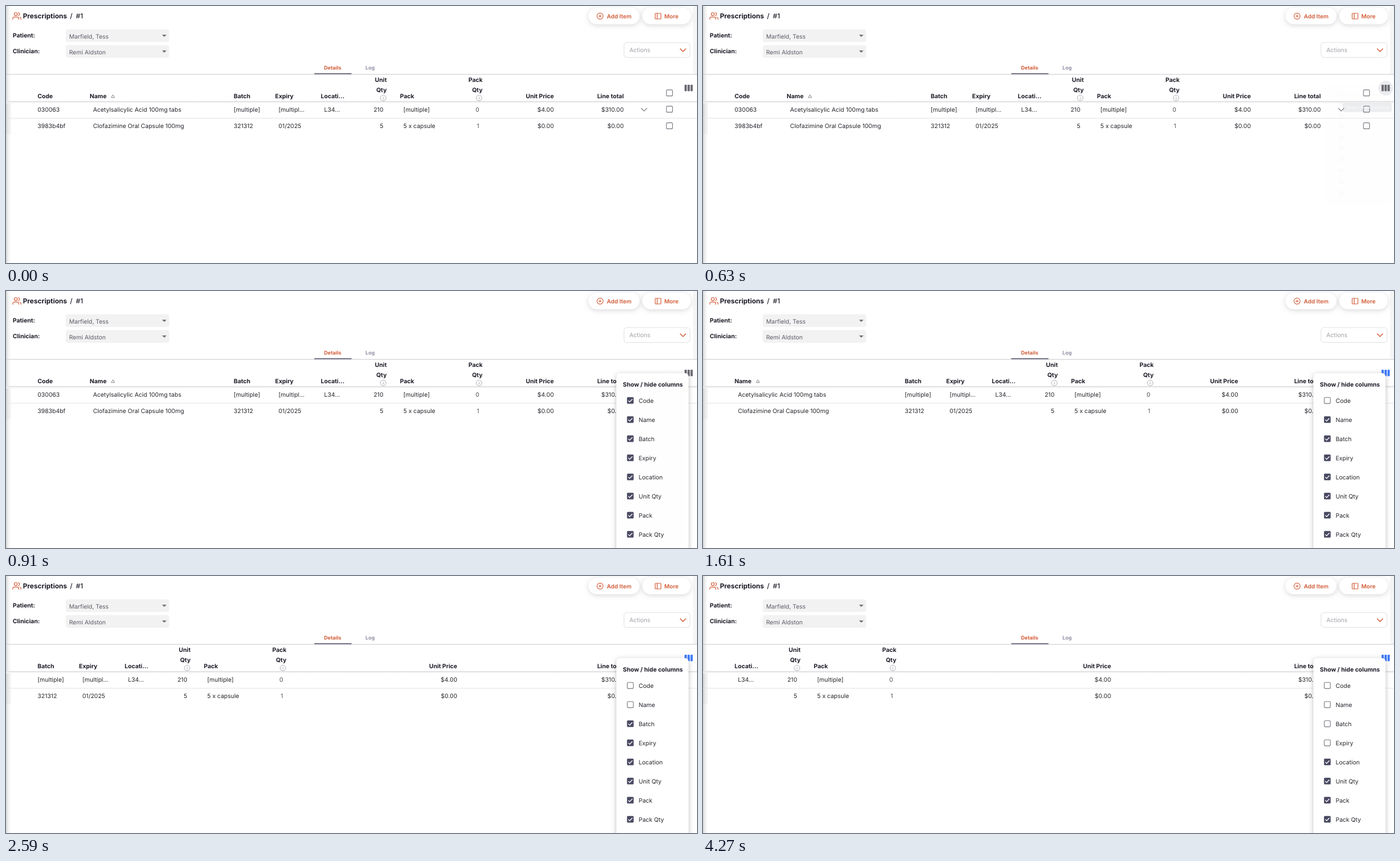
An HTML page with a canvas for the animation above (5250 ms loop, 1226 by 457 pixels).

```html
<!DOCTYPE html>
<html lang="en">
<head>
<meta charset="utf-8">
<title>Column visibility</title>
<style>
  html, body { margin: 0; width: 100%; height: 100%; overflow: hidden; background: #fff; }
  canvas { display: block; width: 1226px; height: 457px; }
</style>
</head>
<body>
<canvas id="stage"></canvas>
<script>
const W = 1226, H = 457, LOOP = 5250, TICK = 70;
const canvas = document.getElementById('stage');
const ctx = canvas.getContext('2d');
const dpr = window.devicePixelRatio || 1;
canvas.width = W * dpr;
canvas.height = H * dpr;
// Keep fractional glyph advances so small text is not snapped to whole pixels
ctx.textRendering = 'geometricPrecision';

const INK = '#1c1c28', BODY = '#25252c', GREY = '#5c5c66';
const ORANGE = '#d15a35', BLUE = '#3e7bfa', SLATE = '#4a4a63';

// Times at which Code, Name, Batch and Expiry are switched off
const HIDE_TIMES = [1610, 2520, 3430, 4270];
// Horizontal shift of the left columns and right edge of Unit Price, by hidden count
const SHIFT = [0, -46, -348, -421.5, -502.5];
const PRICE_RIGHT = [972, 949.5, 800.5, 764, 724];

const LEFT_COLUMNS = [
  { title: 'Batch', x: 404, inset: 0, cells: ['[multiple]', '321312'], until: 3 },
  { title: 'Expiry', x: 477.5, inset: 6, cells: ['[multipl...', '01/2025'], until: 4 },
  { title: 'Locati...', x: 558.5, inset: 6, cells: ['L34...', ''], until: 5 },
  { title: 'Pack', x: 699, inset: 6, cells: ['[multiple]', '5 x capsule'], until: 5 }
];
const QTY_COLUMNS = [
  { title: 'Unit', right: 675.5, cells: ['210', '5'], color: BODY },
  { title: 'Pack', right: 845.5, cells: ['0', '1'], color: '#4c4c55' }
];
const MENU = ['Code', 'Name', 'Batch', 'Expiry', 'Location', 'Unit Qty', 'Pack', 'Pack Qty', 'Unit Price'];
const ROW_Y = [184, 213.5];
const HEAD_Y = 160.5;

const users = new Path2D('M17 21v-2a4 4 0 0 0-4-4H5a4 4 0 0 0-4 4v2 M13 7a4 4 0 1 1-8 0a4 4 0 1 1 8 0 ' +
  'M23 21v-2a4 4 0 0 0-3-3.87 M16 3.13a4 4 0 0 1 0 7.75');

const clamp = v => Math.min(1, Math.max(0, v));

// Standard material easing, cubic-bezier(0.4, 0, 0.2, 1)
function ease(x) {
  x = clamp(x);
  let lo = 0, hi = 1;
  for (let i = 0; i < 24; i++) {
    const m = (lo + hi) / 2, n = 1 - m;
    if (1.2 * n * n * m + 0.6 * n * m * m + m * m * m < x) lo = m; else hi = m;
  }
  return lo * lo * (3 - 2 * lo);
}

// y is the middle of the capitals
function text(s, x, y, { size = 10.5, weight = 400, color = BODY, align = 'left' } = {}) {
  ctx.font = `${weight} ${size}px Inter, sans-serif`;
  ctx.textAlign = align;
  ctx.fillStyle = color;
  ctx.fillText(s, x, y + size * 0.364);
}

const heading = (s, x, y = HEAD_Y, align = 'left') => text(s, x, y, { weight: 700, color: INK, align });

function box(x, y, w, h, r, fill) {
  ctx.beginPath();
  ctx.roundRect(x, y, w, h, r);
  if (fill) {
    ctx.fillStyle = fill;
    ctx.fill();
  }
}

function stroke(color, width = 1, path) {
  ctx.strokeStyle = color;
  ctx.lineWidth = width;
  path ? ctx.stroke(path) : ctx.stroke();
}

function poly(points, color, width, close) {
  ctx.beginPath();
  points.forEach(([x, y]) => ctx.lineTo(x, y));
  if (close) ctx.closePath();
  stroke(color, width);
}

function circle(x, y, r) {
  ctx.beginPath();
  ctx.arc(x, y, r, 0, Math.PI * 2);
}

function shadowed(blur, dy, alpha, draw) {
  ctx.save();
  ctx.shadowColor = `rgba(0,0,0,${alpha})`;
  ctx.shadowBlur = blur * dpr;
  ctx.shadowOffsetY = dy * dpr;
  draw();
  ctx.restore();
}

function checkbox(x, y, checked) {
  if (!checked) {
    box(x - 5.4, y - 5.4, 10.8, 10.8, 2);
    stroke('#74747e', 1.1);
    return;
  }
  box(x - 5.9, y - 5.9, 11.8, 11.8, 1.6, SLATE);
  poly([[x - 3.6, y + 0.2], [x - 1.2, y + 2.6], [x + 3.7, y - 2.5]], '#fff', 1.3);
}

function select(y, value) {
  box(106, y - 11.5, 183.5, 22.5, 4, '#f2f2f3');
  text(value, 112, y + 1, { color: GREY });
  ctx.beginPath();
  [[276.8, y - 2], [284.8, y - 2], [280.8, y + 2.1]].forEach(p => ctx.lineTo(...p));
  ctx.fillStyle = '#707078';
  ctx.fill();
}

function pill(x, w, label, labelX) {
  shadowed(8, 2, 0.15, () => box(x, 3, w, 29.5, 15, '#fff'));
  text(label, labelX, 18, { size: 10.1, weight: 600, color: ORANGE });
}

function drawEdges() {
  const g = ctx.createLinearGradient(0, 0, 9, 0);
  g.addColorStop(0, 'rgba(0,0,0,.17)');
  g.addColorStop(0.4, 'rgba(0,0,0,.06)');
  g.addColorStop(1, 'rgba(0,0,0,0)');
  ctx.fillStyle = g;
  ctx.fillRect(0, 0, 9, H);
  ctx.fillStyle = 'rgba(0,0,0,.03)';
  ctx.fillRect(0, 171, 9, 57);
  ctx.fillStyle = '#f5f5f6';
  ctx.fillRect(1219, 0, 7, 121);
}

function drawHeader() {
  ctx.save();
  ctx.translate(11.4, 9.8);
  ctx.scale(0.66, 0.66);
  ctx.lineCap = ctx.lineJoin = 'round';
  stroke(ORANGE, 1.8, users);
  ctx.restore();
  text('Prescriptions', 30, 17.3, { size: 12, weight: 700, color: INK });
  text('/', 113.5, 17.3, { size: 12, weight: 500, color: INK });
  text('#1', 124, 17.3, { size: 12, weight: 500, color: INK });

  heading('Patient:', 12, 52.5);
  heading('Clinician:', 12, 80.5);
  select(53, 'Marfield, Tess');
  select(81, 'Remi Aldston');

  pill(1033.5, 90.5, 'Add Item', 1066);
  circle(1054, 18, 5.4);
  stroke(ORANGE, 1.1);
  poly([[1051.4, 18], [1056.6, 18]], ORANGE, 1.1);
  poly([[1054, 15.4], [1054, 20.6]], ORANGE, 1.1);
  pill(1129, 86, 'More', 1168);
  box(1151.8, 13, 10.2, 10, 1);
  stroke(ORANGE, 1.2);
  poly([[1155.4, 13], [1155.4, 23]], ORANGE, 1.2);

  box(1096.5, 65, 117, 26.5, 5);
  stroke('#dfdfe4');
  text('Actions', 1106, 78.5, { color: '#a0a0a8' });
  poly([[1196, 75.8], [1201.2, 81], [1206.4, 75.8]], ORANGE, 1.5);

  text('Details', 579.5, 110, { size: 9, weight: 700, color: ORANGE, align: 'center' });
  text('Log', 646, 110, { size: 9, weight: 700, color: '#8f90a6', align: 'center' });
  ctx.fillStyle = '#cbcbd0';
  ctx.fillRect(0, 121, W, 1);
  ctx.fillStyle = '#555770';
  ctx.fillRect(547, 119.6, 66, 1.6);
}

function drawNameColumn(x) {
  heading('Name', x);
  const c = x + 41.3;
  poly([[c, 157.8], [c + 3, 162.8], [c - 3, 162.8]], '#74747d', 0.9, true);
  text('Acetylsalicylic Acid 100mg tabs', x + 6, ROW_Y[0]);
  text('Clofazimine Oral Capsule 100mg', x + 6, ROW_Y[1]);
}

function infoIcon(x, y) {
  circle(x, y, 5);
  stroke('#9a9aa2', 0.8);
  ctx.fillStyle = '#9a9aa2';
  ctx.fillRect(x - 0.4, y - 0.7, 0.9, 3.2);
  ctx.fillRect(x - 0.4, y - 2.6, 0.9, 1);
}

function drawTable(hidden) {
  const g = ctx.createLinearGradient(0, 169, 0, 174);
  g.addColorStop(0, '#d9d9dc');
  g.addColorStop(0.4, '#eeeeef');
  g.addColorStop(1, 'rgba(255,255,255,0)');
  ctx.fillStyle = g;
  ctx.fillRect(0, 169, W, 5);
  ctx.fillStyle = '#e4e4e7';
  ctx.fillRect(0, 199, W, 1);

  const shift = SHIFT[hidden];
  if (hidden === 0) {
    heading('Code', 56);
    ['030063', '3983b4bf'].forEach((s, i) => text(s, 56, ROW_Y[i]));
  }
  if (hidden < 2) drawNameColumn(hidden ? 56 : 148.5);

  for (const { title, x, inset, cells, until } of LEFT_COLUMNS) {
    if (hidden >= until) continue;
    heading(title, x + shift);
    cells.forEach((s, i) => text(s, x + shift + inset, ROW_Y[i]));
  }
  for (const { title, right, cells, color } of QTY_COLUMNS) {
    const r = right + shift;
    heading(title, r, 131, 'right');
    heading('Qty', r, 149, 'right');
    infoIcon(r - 6.2, 163.5);
    cells.forEach((s, i) => text(s, r - 6, ROW_Y[i], { align: 'right', color }));
  }
  const money = (title, right, cells) => {
    heading(title, right, HEAD_Y, 'right');
    cells.forEach((s, i) => text(s, right, ROW_Y[i], { align: 'right' }));
  };
  money('Unit Price', PRICE_RIGHT[hidden], ['$4.00', '$0.00']);
  money('Line total', 1096, ['$310.00', '$0.00']);

  poly([[1127, 181.6], [1132.2, 186.8], [1137.4, 181.6]], '#66666f', 1.1);
  [154.5, 183.5, 213].forEach(y => checkbox(1177.2, y, false));
}

function drawColumnsIcon(t, hidden) {
  const hover = clamp((t - 520) / 130) * clamp((840 - t) / 140);
  if (hover > 0) {
    circle(1211.3, 146, 13);
    ctx.fillStyle = `rgba(40,41,61,${0.1 * hover})`;
    ctx.fill();
  }
  for (let i = 0; i < 3; i++) {
    box(1203.9 + i * 5.3, 140, 4, 11.5, 0.8, hidden ? BLUE : '#6b6b73');
  }
}

function drawMenu(t, hidden) {
  const age = t - 602;
  if (age <= 0) return;
  const grow = ease(age / 231);
  const scale = 0.75 + 0.25 * grow;
  ctx.save();
  ctx.globalAlpha = ease(age / 347);
  ctx.translate(1211, 146);
  ctx.scale(scale, 0.5625 + 0.4375 * grow);
  ctx.translate(-1211, -146);
  shadowed(9, 2, 0.26, () => box(1083, 146, 128, 340, 6, '#fff'));
  heading('Show / hide columns', 1094.5, 166.5);
  MENU.forEach((label, i) => {
    const y = 195 + 34 * i;
    checkbox(1107.7, y - 0.3, i >= hidden);
    text(label, 1122.5, y + 0.3);
  });
  ctx.restore();
}

function drawTooltip(t) {
  const alpha = 0.1 * clamp((t - 580) / 50) * clamp((800 - t) / 120);
  if (alpha <= 0) return;
  ctx.save();
  ctx.globalAlpha = alpha;
  box(1135, 172, 87, 16.5, 3, '#555770');
  ctx.globalAlpha = Math.min(1, alpha * 7);
  text('Show / hide columns', 1178.5, 180.2, { size: 7.6, weight: 500, color: '#fff', align: 'center' });
  ctx.restore();
}

function render(t) {
  const hidden = HIDE_TIMES.filter(h => t >= h).length;
  ctx.setTransform(dpr, 0, 0, dpr, 0, 0);
  ctx.fillStyle = '#fff';
  ctx.fillRect(0, 0, W, H);
  drawEdges();
  drawHeader();
  drawTable(hidden);
  drawColumnsIcon(t, hidden);
  drawMenu(t, hidden);
  drawTooltip(t);
}

function loop() {
  const t = performance.now() % LOOP;
  render(Math.floor(t / TICK) * TICK);
  requestAnimationFrame(loop);
}
loop();
</script>
</body>
</html>
```
